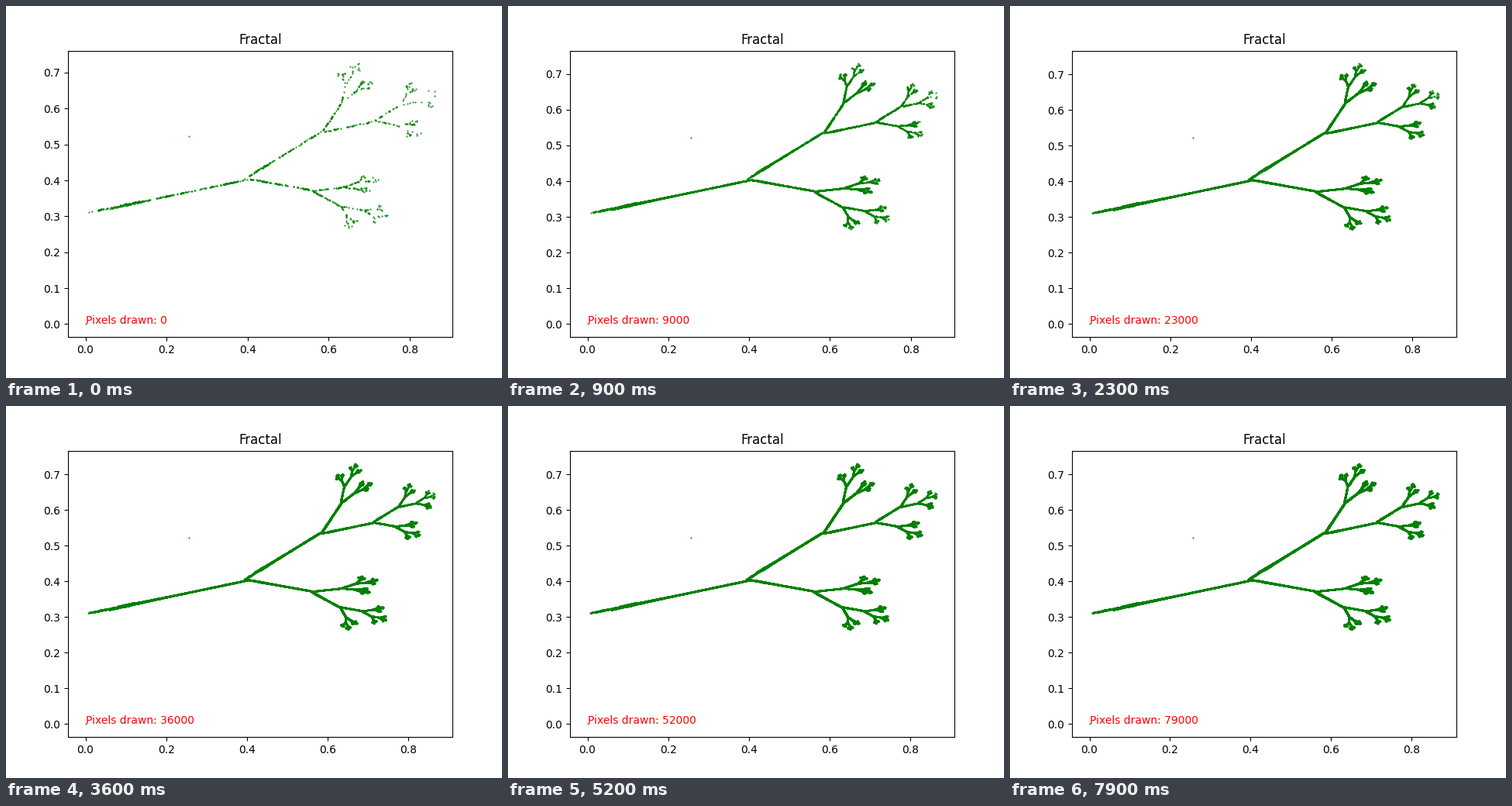
Recreate the animation shown at these times as a matplotlib script. Size 640 by 480 pixels, loop 8 s.

```python
import random

import matplotlib.pyplot as plt
import numpy as np
from matplotlib.animation import FuncAnimation

FRAMES = 80
STEP = 1000

# Affine maps of the twig: x' = a*x + b*y + e, y' = c*x + d*y + f
MAPS = [
    (0.387, 0.430, 0.430, -0.387, 0.2560, 0.5220),
    (0.441, -0.091, -0.009, -0.322, 0.4219, 0.5059),
    (-0.468, 0.020, -0.113, 0.015, 0.4, 0.4),
]


def chaos_game(count, seed=7):
    rng = random.Random(seed)
    # The opening pair leaves one stray point, then lands on the twig
    picks = [MAPS[0], MAPS[2]] + rng.choices(MAPS, k=count - 3)
    x = y = 0.0
    points = [(x, y)]
    for a, b, c, d, e, f in picks:
        x, y = a * x + b * y + e, c * x + d * y + f
        points.append((x, y))
    return np.array(points)


points = chaos_game(FRAMES * STEP)

fig, ax = plt.subplots(figsize=(6.4, 4.8), dpi=100)
ax.set_title("Fractal")
dots, = ax.plot([], [], ".", color="green", markersize=1)
label = ax.text(0, 0, "", color="red")


def update(frame):
    dots.set_data(*points[:(frame + 1) * STEP].T)
    label.set_text(f"Pixels drawn: {frame * STEP}")
    ax.relim()
    ax.autoscale_view()
    return dots, label


anim = FuncAnimation(fig, update, frames=FRAMES, interval=100,
                     repeat=True, repeat_delay=0, blit=False)
plt.show()
```
